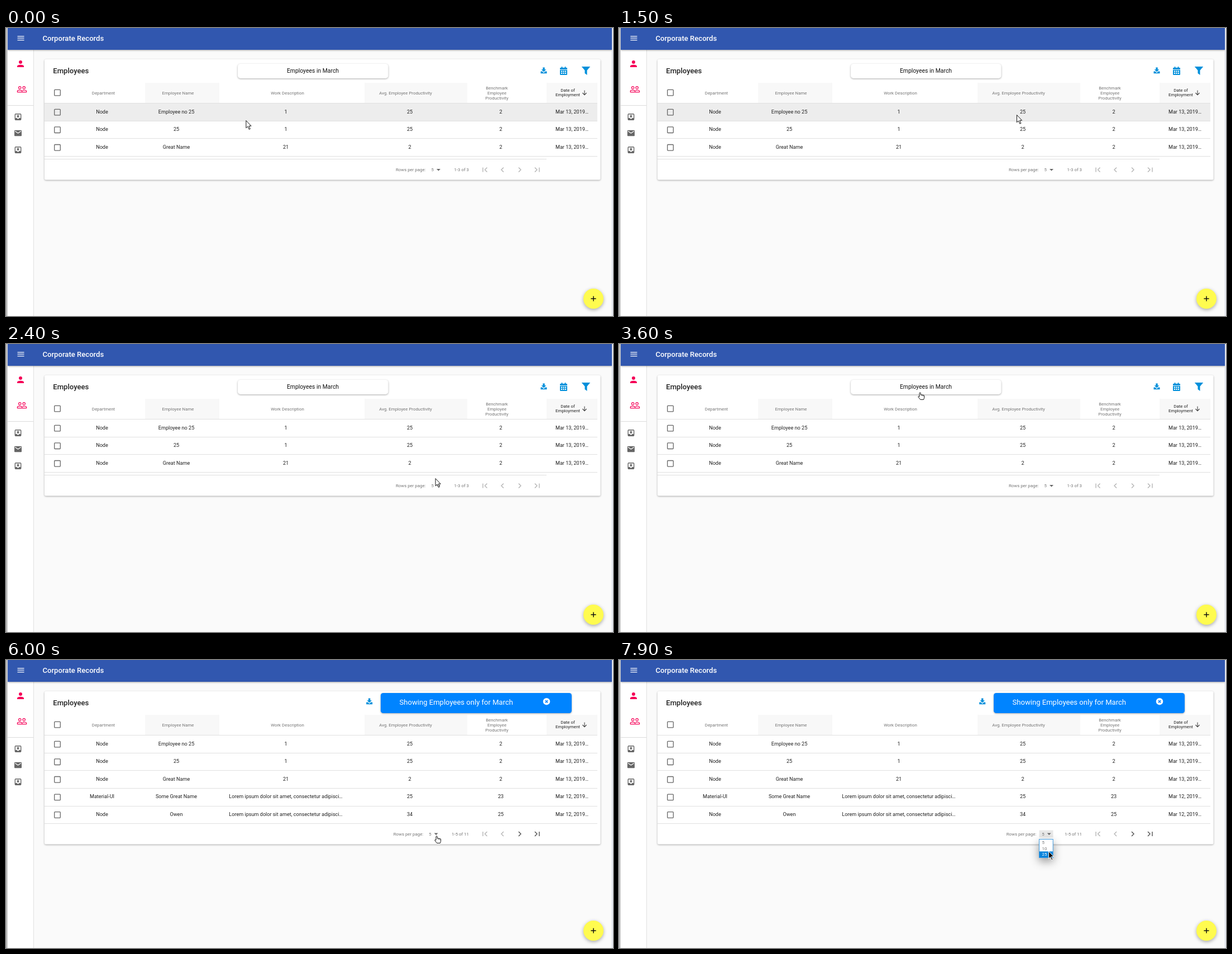
These frames come from a looping animation (1087 px wide and 515 px high, 8000 ms). An HTML page:

```html
<!DOCTYPE html>
<html lang="en">
<head>
<meta charset="utf-8">
<title>Corporate Records</title>
<style>
  html, body { margin: 0; width: 100%; height: 100%; overflow: hidden; background: #fafafa; }
  svg { display: block; font-family: Roboto, sans-serif; }
  .raised { filter: drop-shadow(0 1px 1.5px #0005); }
  .line { fill: none; stroke: currentColor; }
</style>
</head>
<body>
<svg id="stage" width="1087" height="515" viewBox="0 0 1087 515"></svg>
<script>
const BLUE = '#0090db', GREY = '#757575', INK = '#212121';
const LOREM = 'Lorem ipsum dolor sit amet, consectetur adipisci…';
const ROWS = [
  ['Node', 'Employee no 25', '1', '25', '2', 'Mar 13, 2019…'],
  ['Node', '25', '1', '25', '2', 'Mar 13, 2019…'],
  ['Node', 'Great Name', '21', '2', '2', 'Mar 13, 2019…'],
  ['Material-UI', 'Some Great Name', LOREM, '25', '23', 'Mar 12, 2019…'],
  ['Node', 'Owen', LOREM, '34', '25', 'Mar 12, 2019…'],
];
const COLUMNS = [172, 305, 501, 723, 886, 1013.5];
const TOP = 135, PITCH = 31.6;

const text = (s, x, y, size, fill = INK, anchor = 'middle', extra = '') =>
  `<text x="${x}" y="${y}" font-size="${size}" fill="${fill}" text-anchor="${anchor}" ${extra}>${s}</text>`;
const rect = (x, y, w, h, fill, extra = '') =>
  `<rect x="${x}" y="${y}" width="${w}" height="${h}" fill="${fill}" ${extra}/>`;
const at = (x, y, body, extra = '') => `<g transform="translate(${x} ${y})" ${extra}>${body}</g>`;
const path = (d, fill, extra = '') => `<path d="${d}" fill="${fill}" ${extra}/>`;
const line = (d, color, width = 1.3) => `<path class="line" d="${d}" color="${color}" stroke-width="${width}"/>`;
const rule = (y, right = 1059) => rect(69, y, right - 69, 1, '#e0e0e0');
const checkbox = y => rect(86.7, y - 5.3, 10.6, 10.6, 'none', 'rx="1" stroke="#666" stroke-width="1.3"');

const download = path('M-1.7-5.5h3.4v3.8h2.6L0 2.5-4.3-1.7h2.6zM-5.5 1.6h2.8L0 4.2 2.7 1.6h2.8v3.7h-11z', BLUE);
const calendar = rect(-6.5, -5.5, 13, 13, BLUE, 'rx="1"') + rect(-4, -7.3, 2, 3, BLUE) + rect(2, -7.3, 2, 3, BLUE)
  + rect(-6.5, -2.4, 13, .9, '#fff')
  + [-4.6, -1.1, 2.4].map(x => [0, 3.4].map(y => rect(x, y, 2.2, 2.1, '#fff')).join('')).join('');
const funnel = path('M-7.7-7.5H7.7L2-.8V7.5l-4-2.9V-.8z', BLUE);
const inbox = rect(-5.2, -5.2, 10.4, 10.4, 'none', 'rx="1" stroke="#666" stroke-width="1.4"')
  + path('M-5 2h3q2 3.6 4 0h3v3.4H-5zM-1.2-3.4h2.4v2.2h1.5L0 1.5l-2.7-2.7h1.5z', '#666');
const mail = rect(-6.5, -5.2, 13, 10.4, '#666', 'rx="1"') + line('M-5.4-3.4 0 .1 5.4-3.4', '#fff', 1.2);
const person = '<circle cy="-3" r="3" fill="#f50057"/>' + path('M-6 6V4.2C-6 .8 6 .8 6 4.2V6z', '#f50057');
const people = line('M-8.1 4.7V3C-8.1.6.3.6.3 3V4.7zM.3 4.7H8.1V3C8.1 1 3.2.8 1 1.6', '#f50057', 1.2)
  + [-3.7, 3.7].map(x => `<circle class="line" cx="${x}" cy="-3.2" r="2.2" color="#f50057" stroke-width="1.2"/>`).join('');

const arrowShape = 'M.4.5V13.8L3.4 11l2.4 5.3 2-.9L5.5 10.2H9.6z';
const handShape = 'M3 8.2V1.6Q4.1-.2 5.3 1.6V5Q8.6 4.4 11.6 6.2V10.4L10.5 13.4H4.6L.7 8.4Q1 6.6 3 8.2z';

const header = [['Department', 174.5], ['Employee Name', 308], ['Work Description', 504], ['Avg. Employee Productivity', 715.5]]
  .map(([s, x]) => text(s, x, 118.6, 7.86, GREY)).join('')
  + ['Benchmark', 'Employee', 'Productivity'].map((s, i) => text(s, 879, 109.5 + 9.1 * i, 7.86, GREY)).join('')
  + text('Date of', 1006, 114, 7.86) + text('Employment', 1006, 122, 7.86)
  + line('M1036 111.5v8M1032.4 116l3.6 3.6 3.6-3.6', '#444', 1.1);

const row = (cells, i) => {
  const y = TOP + PITCH * i;
  return `<g id="row${i}">` + rect(69, y, 990, PITCH, '#ededed', `id="hover${i}"`)
    + rule(Math.round(y + PITCH - .8)) + checkbox(y + 15.6)
    + cells.map((s, c) => text(s, COLUMNS[c], (y + 17.5).toFixed(1), 9.12)).join('') + '</g>';
};

const pager = (x, y, range, more) => {
  const off = '#b0b0b0', on = more ? '#444' : off;
  return at(0, y, text('Rows per page:', x, 2.7, 7.85, GREY, 'start')
    + text('5', x + 63.5, 2.7, 7.85, GREY, 'start') + path(`M${x + 73}-1.5h7l-3.5 3.6z`, '#666')
    + text(range, 829, 2.7, 7.85, GREY, 'end')
    + line('M854-4V4M861.5-4l-4 4 4 4M891-4l-4 4 4 4', off)
    + line('M918-4l4 4-4 4M947-4l4 4-4 4M955-4V4', on));
};

const option = (s, i) => rect(752.7, 320.7 + 10.8 * i, 24.2, 10.8, '#0a84dc', `id="pick${i}"`)
  + text(s, 757.5, 329 + 10.6 * i, 7.85, GREY, 'start', `id="option${i}"`);

document.getElementById('stage').innerHTML =
  rect(0, 0, 1087, 515, '#fafafa') + rect(3, 39, 46, 476, '#fff') + rect(49, 39, 1, 476, '#e0e0e0')
  + rect(3, 0, 1082, 39, '#3157af', 'class="raised"')
  + rect(0, 0, 3, 515, '#f2f2f2') + rect(1, 0, 1, 515, '#777')
  + rect(1085, 0, 2, 515, '#fff') + rect(1085, 0, 1, 515, '#cdd3e2')
  + line('M20.5 14.8h12M20.5 18.2h12M20.5 21.6h12', '#fff', 1.3)
  + text('Corporate Records', 65.5, 22.6, 13.1, '#fff', 'start', 'font-weight="500"')
  + at(26, 64, person) + at(28.5, 110, people) + rect(3, 138, 46, 1, '#dcdcdc')
  + at(21.5, 159, inbox) + at(21.5, 188, mail) + at(21.5, 218, inbox)
  + rect(69, 56, 995.5, 215.5, '#fff', 'id="card" class="raised" rx="2.5"')
  + text('Employees', 84.3, 81, 13.1, INK, 'start', 'font-weight="500"')
  + [[249, 133], [642, 184], [968, 91]].map(([x, w]) => rect(x, 98, w, 37, '#f8f8f8')).join('')
  + header + checkbox(115.6) + rule(134) + ROWS.map(row).join('')
  + '<g id="plain">' + rule(234, 968) + pager(698, 253.5, '1-3 of 3', false)
  + rect(415, 64, 269.5, 26, '#fff', 'class="raised" rx="5"') + text('Employees in March', 549.5, 80.3, 10.4, '#111')
  + at(963, 76, download) + at(998.5, 76.5, calendar) + at(1038.5, 76.5, funnel) + '</g>'
  + '<g id="filtered">' + rect(752.5, 304.5, 25, 13, '#e8e8e8', 'id="focus"') + pager(693.7, 311, '1-5 of 11', true)
  + at(650.7, 74, download) + rect(671, 59, 342, 36, '#0084ff', 'class="raised" rx="4.5"')
  + text('Showing Employees only for March', 806.3, 80.3, 13.05, '#fff')
  + at(968, 74.2, '<circle r="6.2" fill="#fff"/>' + line('M-2.2-2.2 2.2 2.2M2.2-2.2-2.2 2.2', '#0084ff', 1.6)) + '</g>'
  + '<g id="menu">' + rect(752.5, 320.5, 24.7, 33, '#fff', 'stroke="#3f9be0" style="filter:drop-shadow(0 6px 8px #0006)"')
  + ['5', '10', '25'].map(option).join('') + '</g>'
  + '<circle cx="1052" cy="484" r="18" fill="#fffb4f" style="filter:drop-shadow(0 2px 3px #0005)"/>'
  + line('M1047.4 484h9.2M1052 479.4v9.2', '#111', 1.5)
  + '<g id="cursor">' + path(arrowShape, '#fff', 'id="arrow" stroke-linejoin="round"')
  + `<g id="hand">${path(handShape, '#fff', 'stroke="#111" stroke-linejoin="round"')}${line('M7.6 5.2v2M9.6 5.6v1.8', '#111', .7)}</g></g>`;

// Pointer stops: time, x, y, hand shape; each holds until the next.
const STOPS = [
  [0, 429.5, 165], [1300, 533.5, 74.5], [1400, 575, 88], [1500, 712, 155], [1600, 803.5, 212.5], [1700, 803, 211],
  [2200, 793, 222], [2300, 778, 234], [2400, 768.7, 240], [2500, 765, 247, 1], [3000, 767, 252, 1],
  [3300, 758, 246], [3400, 722, 232], [3500, 592, 116], [3600, 535, 86, 1], [3700, 517, 76, 1],
  [4500, 520.5, 76], [5100, 570, 108], [5200, 787, 314.5],
  [5400, 790, 328], [5500, 792, 352], [5600, 792, 369], [5700, 787, 358], [5800, 779, 338], [5900, 771, 322], [6000, 767, 314, 1],
  [7200, 769, 329], [7300, 771, 341.5], [7700, 766, 342], [7800, 762.5, 342], [7900, 769, 341.5],
];
const el = id => document.getElementById(id);
const show = (id, on) => el(id).style.display = on ? '' : 'none';

function draw() {
  const t = performance.now() % 8000;
  const [, x, y, hand] = STOPS.findLast(stop => stop[0] <= t);
  const filtered = t >= 4400, open = t >= 6500;
  const picked = t < 7200 ? 0 : t < 7300 ? 1 : 2;

  show('plain', !filtered);
  show('filtered', filtered);
  el('card').setAttribute('height', filtered ? 273.5 : 215.5);
  ROWS.forEach((_, i) => {
    show('row' + i, filtered || i < 3);
    show('hover' + i, !filtered && Math.floor((y - TOP) / PITCH) === i);
  });
  show('focus', open);
  show('menu', open);
  for (let i = 0; i < 3; i++) {
    show('pick' + i, i === picked);
    el('option' + i).setAttribute('fill', i === picked ? '#fff' : GREY);
  }
  el('cursor').setAttribute('transform', `translate(${x} ${y})`);
  show('arrow', !hand);
  show('hand', hand);
  el('arrow').setAttribute('fill', open ? '#111' : '#fff');
  el('arrow').setAttribute('stroke', open ? '#fff' : '#111');
  requestAnimationFrame(draw);
}
draw();
</script>
</body>
</html>
```
